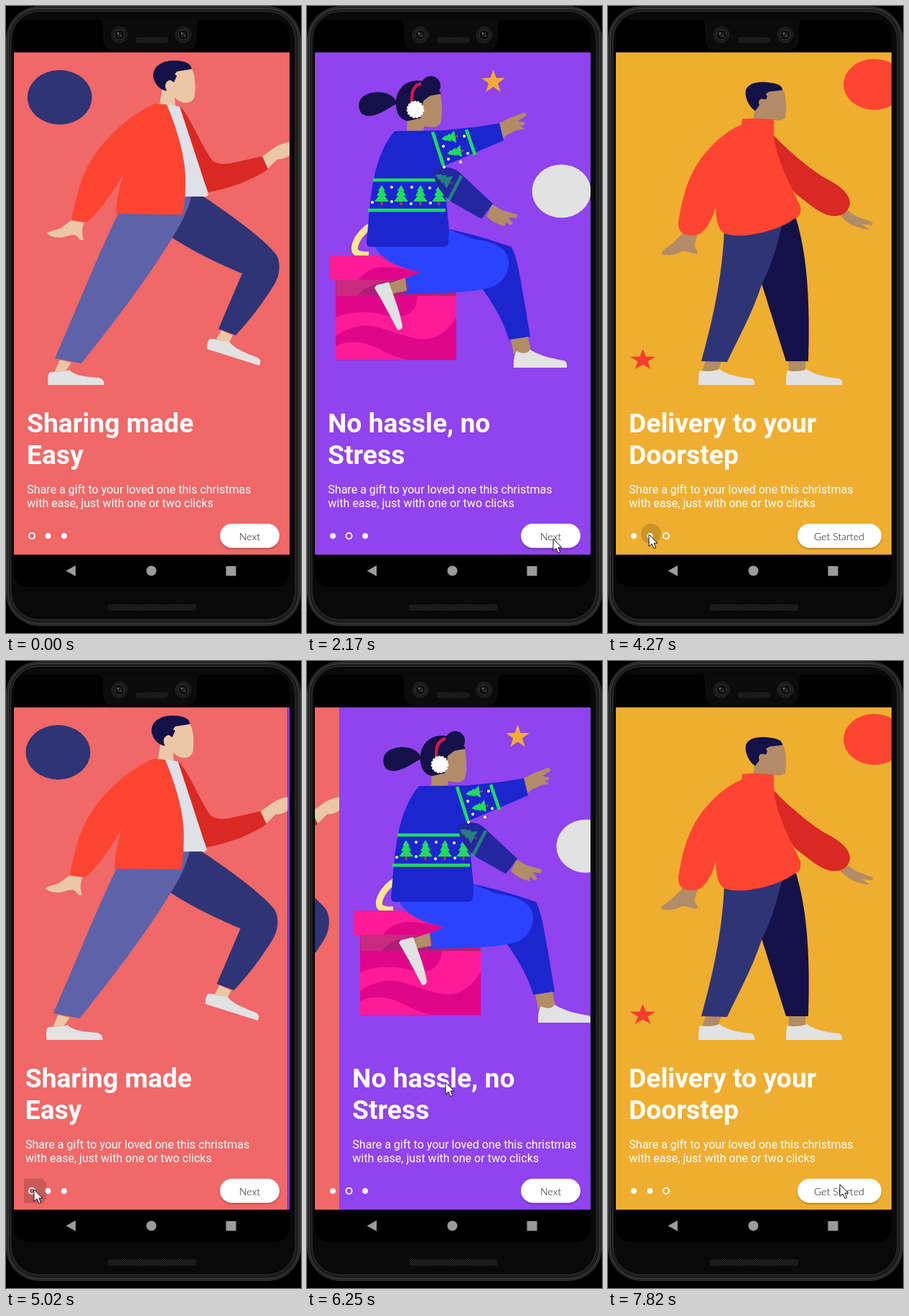
An HTML page that plays this animation: 411x872 px, repeating every 8 s.

```html
<!DOCTYPE html>
<html lang="en">
<head>
<meta charset="utf-8">
<title>Onboarding</title>
<style>
html, body { margin: 0; width: 100%; height: 100%; overflow: hidden; background: #000; }
svg { display: block; width: 411px; height: 872px; }
text { font-family: Roboto, sans-serif; fill: #fff; }
.title { font-size: 37.3px; font-weight: 700; }
.sub { font-size: 16.05px; }
.label { font: 300 14.1px Lato, sans-serif; fill: #1c0c18; text-anchor: middle; }
.skin { fill: #ebc7a6; } .brown { fill: #b28c66; }
.ink { fill: #131147; } .navy { fill: #2e3476; } .blue { fill: #1b26cf; }
.red { fill: #ff4532; } .deep { fill: #da2822; }
.shoe { fill: #e2e2e2; } .pink { fill: #ff1b97; } .rose { fill: #e0068a; }
.green { stroke: #1fdc5c; stroke-width: 4.6; fill: none; }
</style>
</head>
<body>
<svg viewBox="0 0 411 872">
<defs>
  <clipPath id="screen"><rect x="11" y="64.5" width="384" height="698.5"/></clipPath>
  <clipPath id="page"><rect x="11" y="64" width="384" height="700"/></clipPath>
  <clipPath id="dotBox"><rect x="25" y="720" width="31" height="34"/></clipPath>
  <filter id="shadow" x="-10%" y="-20%" width="120%" height="160%">
    <feDropShadow dx="0" dy="1.5" stdDeviation="1.2" flood-color="#000" flood-opacity=".35"/>
  </filter>
  <pattern id="mesh" width="3" height="3" patternUnits="userSpaceOnUse">
    <rect width="3" height="3" fill="#0c0c0c"/><path d="M0 3L3 0" stroke="#3a3a3a"/>
  </pattern>
  <g id="cam">
    <circle r="11" fill="#191919" stroke="#262626"/><circle r="7" fill="#0b0b0b" stroke="#3a3a3a"/>
    <circle r="3.5" fill="#222"/><circle cx="-2" cy="-2" r="1.2" fill="#777"/><circle cx="2.5" cy="2" r="1" fill="#555"/>
  </g>
  <g id="tree">
    <path d="M-1.5 8h3v6h-3z" fill="#a8433c"/>
    <path d="M0-14L5-6H3L7 1H4L10 9H-10L-4 1H-7L-3-6H-5Z" fill="#1fdc5c"/>
  </g>
  <path id="star" d=""/>
</defs>

<!-- phone -->
<rect x=".5" y="1" width="410" height="860.5" rx="46" fill="#1c1c1c" stroke="#3c3c3c"/>
<rect x="3" y="3.5" width="405" height="855.5" rx="43" fill="none" stroke="#4a4a4a"/>
<rect x="7" y="7.5" width="396" height="846" rx="39" fill="#090909" stroke="#333"/>
<rect x="11" y="19" width="384" height="789" rx="20"/>
<path d="M128 18Q135 19 135 28V44Q135 62 153 62H248Q266 62 266 44V28Q266 19 273 18Z" fill="#0b0b0b"/>
<use href="#cam" x="158" y="40"/><use href="#cam" x="247" y="40"/>
<rect x="181" y="43.5" width="45" height="8" rx="4" fill="url(#mesh)"/>
<rect x="142" y="832" width="123" height="9" rx="3" fill="url(#mesh)"/>
<g fill="#9b9b9b"><path d="M83.5 785.5L97 778V793Z"/><circle cx="202.5" cy="785.5" r="7"/><rect x="306.5" y="779" width="14" height="13.5"/></g>

<g clip-path="url(#screen)">
  <g class="page"><g clip-path="url(#page)">
    <rect x="11" y="64" width="384" height="700" fill="#f06868"/>
    <ellipse class="navy" cx="74.8" cy="127" rx="45" ry="38"/>
    <path class="navy" d="M256 265H275C320 295 360 325 376 345C384 357 381 375 374 387C360 410 340 437 320 458L296 449L329 372C310 364 268 346 231 322Z"/>
    <path d="M156 289L249 265H258C255 280 245 302 232 322C200 375 150 441 105 497L68 490C95 430 122 360 156 289Z" fill="#5d62a9"/>
    <path class="skin" d="M75 492L91 496L82 509L68 508ZM300 451L316 458L311 468L293 463ZM214 137L218 112L240 89L258 87C264 95 264 110 263 124C262 133 253 136 246 134Q239 132 235 127L236 140Z"/>
    <path class="ink" d="M224 118C213 117 205 105 205 96C206 82 220 75 236 76C251 76 260 82 258 88L238 91L235 95L238 97L234 106L229 103C222 104 220 111 224 118Z"/>
    <path class="shoe" d="M60 510C66 507 80 510 88 506C95 514 112 516 130 517Q137 519 137 527H59Q57 516 60 510ZM284 463C292 462 302 467 311 467C318 477 336 483 350 489Q357 492 353 500L280 477Q280 466 284 463Z"/>
    <path class="deep" d="M242 139C257 154 270 190 286 213C291 220 302 220 312 219L357 209L365 227C343 242 314 253 282 259L255 200Z"/>
    <path class="skin" d="M357 209L374 197Q386 190 395 189V208Q386 214 378 213L365 226ZM91 298L76 309C68 312 60 313 57 316C62 322 74 323 82 321C90 318 95 317 99 320C102 325 107 328 108 324C106 316 105 312 109 301Z"/>
    <path d="M222 136L242 140L282 262Q281 266 276 265H247Z" fill="#dee1e8"/>
    <path class="red" d="M208 136L224 137C240 175 251 215 250 245C250 260 249 277 246 290L153 289C154 270 158 250 164 232C150 260 130 285 113 301L91 298C98 262 106 232 124 206C148 172 182 146 208 136Z"/>
  </g></g>

  <g class="page"><g clip-path="url(#page)">
    <rect x="11" y="64" width="384" height="700" fill="#9043ee"/>
    <use href="#star" transform="translate(259.5 105.5) scale(17.3)" fill="#efae30"/>
    <ellipse class="shoe" cx="354.5" cy="257.5" rx="41" ry="37"/>
    <path d="M88 306C73 316 64 332 67 341Q70 346 86 346" fill="none" stroke="#ffe68f" stroke-width="9"/>
    <rect class="rose" x="40" y="381" width="168" height="111.5"/>
    <path class="pink" d="M40 433C62 424 88 424 110 430C135 436 153 428 154 403H208V432C195 455 175 468 150 462C115 455 95 440 70 446Q50 450 40 459ZM40 474C58 462 85 469 100 477Q120 488 140 492H40Z"/>
    <rect x="41" y="381" width="167" height="22" fill="#b01d78"/>
    <path d="M70 403C85 386 100 386 125 381H41V403Z" fill="#c82a80"/>
    <path class="pink" d="M31 347H110L158 370L137 381H31Z"/>
    <path class="rose" d="M72 381C80 368 95 362 110 363Q135 364 158 370L137 381Z"/>
    <path class="blue" d="M196 310C230 317 262 327 285 335C293 350 297 378 301 400L311 460L281 464C275 440 258 412 244 393Z"/>
    <path class="brown" d="M284 464L308 460L312 480L304 487L288 484ZM113 386L137 378L139 396L119 400Z"/>
    <path d="M94 333L198 311L232 324C266 328 282 341 281 358C280 376 268 390 250 393C222 399 180 400 134 400L141 394L137 379L158 370C120 362 102 351 94 333Z" fill="#2b43ff"/>
    <path class="shoe" d="M292 480C300 484 306 484 311 478C325 487 345 491 358 493Q363 495 362 503H288Q287 487 292 480ZM97 388L114 384C120 402 130 425 133 446Q131 452 126 450C118 435 105 410 94 392Z"/>
    <path class="ink" d="M124 132C116 117 90 117 78 126C70 132 71 146 78 151C92 158 110 144 125 136Z"/>
    <circle class="ink" cx="172.5" cy="111" r="13.5"/>
    <path class="brown" d="M156 122H186C188 135 189 150 187 160C185 169 175 170 163 167L162 176H139L140 148Z"/>
    <path class="ink" d="M124 140C122 122 132 106 150 104C165 102 182 111 187 122L171 125L162 132L158 156L140 160Q126 157 124 140Z"/>
    <path d="M147 138C144 120 149 110 159 108" fill="none" stroke="#d4164c" stroke-width="4.5"/>
    <circle cx="151" cy="144" r="11" fill="#fff" stroke="#fff" stroke-width="2.5" stroke-dasharray="3 1.5"/>
    <path class="brown" d="M268 163L284 155Q295 151 303 148L306 152L294 160L304 162L302 166H297L303 171L291 173C286 177 279 176 273 185ZM258 276L272 284L293 290L292 295L281 294L287 303L283 305L277 300L276 306Q260 303 250 292Z"/>
    <path class="blue" d="M122 174L190 173L238 168L268 163L274 187L192 222L190 232L198 312L197 329Q196 335 190 335H88Q83 335 83 328C86 300 87 270 93 240C98 215 108 190 122 174Z"/>
    <path class="green" d="M92 242H186M85 284H193M175 175L190 222M222 172L234 207"/>
    <use href="#tree" x="104" y="263"/><use href="#tree" x="131" y="263"/><use href="#tree" x="158" y="263"/><use href="#tree" x="184" y="263"/>
    <use href="#tree" transform="translate(199 183) rotate(-100) scale(.85)"/>
    <use href="#tree" transform="translate(207 203) rotate(-100) scale(.85)"/>
    <path d="M176 229C188 221 205 224 213 232L259 275L243 296L202 273C188 262 178 249 176 229Z" fill="#23279f"/>
    <path class="green" d="M215 236L197 271" opacity=".5"/>
    <use href="#tree" transform="translate(191 241) rotate(-62)" opacity=".5"/>
    <g id="snow" fill="#fff"></g>
  </g></g>

  <g class="page"><g clip-path="url(#page)">
    <rect x="11" y="64" width="384" height="700" fill="#efae30"/>
    <ellipse class="red" cx="371" cy="109" rx="43" ry="35.5"/>
    <use href="#star" transform="translate(48.5 492.5) scale(18.5 15.5)" fill="#f83c30"/>
    <path class="brown" d="M136 494H158L153 508H131ZM251 493H276L274 508H252ZM202 158L206 136L224 118L244 116C249 128 249 142 247 156Q240 161 226 158ZM104 316L90 330C80 338 73 341 75 345C84 348 95 346 103 341C112 340 118 346 125 344C126 340 119 336 121 330L125 318ZM334 284L345 292L369 301L368 305L353 303L364 310Q362 312 356 310C345 307 335 304 324 292Z"/>
    <path class="ink" d="M205 146C195 139 190 125 192 117C196 106 212 104 228 107Q243 109 243 117L225 119L220 122L222 126L220 130L214 129Q208 131 211 138Z"/>
    <path class="ink" d="M238 304L261 292C276 340 282 400 279 494H248L214 386Z"/>
    <path class="navy" d="M162 312L243 303C236 332 228 360 214 388C200 430 180 465 166 495L130 494C145 440 159 380 162 312Z"/>
    <path id="foot" class="shoe" d="M128 507C138 509 148 508 155 505C165 513 185 517 200 518Q205 520 204 527H126Q126 512 128 507Z"/>
    <use href="#foot" x="122"/>
    <path class="deep" d="M230 179C250 200 275 222 300 238C320 248 338 260 337 276Q333 291 318 292C300 294 280 275 260 260C243 235 231 215 230 179Z"/>
    <path class="red" d="M187 157Q209 155 231 158V180C234 212 254 250 268 278C270 290 265 294 258 297C235 314 180 326 160 315C152 308 150 292 150 279Q145 300 133 313Q122 323 105 317Q97 312 98 300C103 270 110 235 135 205C150 187 168 172 186 165Z"/>
  </g></g>

  <g fill="#000" opacity=".15"><circle class="tap" cx="60" cy="734"/><g clip-path="url(#dotBox)"><circle class="tap" cx="38" cy="737"/></g></g>
  <g id="dots" stroke-width="1.9"></g>
  <g id="button">
    <rect y="720" height="33.5" rx="16.75" fill="#fff" filter="url(#shadow)"/>
    <text class="label" y="743"></text>
  </g>
</g>
<path id="cursor" d="M0 0V16.5L4 13L7 19.5L9.8 18.3L7 12H12Z" fill="#fff" stroke="#111"/>
</svg>
<script>
const NS = 'http://www.w3.org/2000/svg', LOOP = 8000, WIDTH = 384;
const $ = id => document.getElementById(id);
const add = (parent, tag, attrs, text) => {
  const el = parent.appendChild(document.createElementNS(NS, tag));
  for (const k in attrs) el.setAttribute(k, attrs[k]);
  if (text) el.textContent = text;
  return el;
};

$('star').setAttribute('d', 'M' + Array.from({length: 10}, (_, i) => {
  const r = i % 2 ? 0.39 : 1, a = i * Math.PI / 5;
  return (r * Math.sin(a)).toFixed(3) + ' ' + (-r * Math.cos(a)).toFixed(3);
}).join('L') + 'Z');

const flakes = [[118, 252], [91, 273], [146, 252], [118, 272], [171, 253], [145, 275], [172, 274],
  [190, 195], [219, 181], [197, 213], [224, 205], [191, 224], [214, 217]];
for (const [cx, cy] of flakes) add($('snow'), 'circle', {cx, cy, r: 2});

const pages = [...document.querySelectorAll('.page')];
const titles = [['Sharing made', 'Easy'], ['No hassle, no', 'Stress'], ['Delivery to your', 'Doorstep']];
const sub = ['Share a gift to your loved one this christmas', 'with ease, just with one or two clicks'];
pages.forEach((page, i) => {
  titles[i].forEach((s, n) => add(page, 'text', {class: 'title', x: 29, y: 593 + 44 * n}, s));
  sub.forEach((s, n) => add(page, 'text', {class: 'sub', x: 29.3, y: 678 + 19 * n}, s));
});
const dots = [36, 58.5, 81].map(cx => add($('dots'), 'circle', {cx, cy: 737, stroke: '#fff'}));

const linear = u => u;
const smooth = u => u * u * (3 - 2 * u);
const settle = u => 1 - (1 - u) ** 4;
// cubic-bezier(.25, .1, .25, 1)
const ease = u => {
  let lo = 0, hi = 1, s;
  for (let i = 0; i < 20; i++) {
    s = (lo + hi) / 2;
    const x = .75 * s * (1 - s) + s ** 3;
    x < u ? lo = s : hi = s;
  }
  return .3 * s * (1 - s) ** 2 + 3 * s * s * (1 - s) + s ** 3;
};

// [time, page, easing towards it]
const scroll = [[0, 0], [1660, 0], [2140, 1, ease], [2390, 1], [2730, 2, ease], [4290, 2], [4640, 1, ease],
  [4680, 1], [5060, 0, ease], [5750, 0], [6050, .365, linear], [6567, 1, settle],
  [6600, 1], [6900, 1.477, linear], [7260, 2, settle]];
// [time, x, y, easing]
const pointer = [[590, 338, 822], [980, 319, 708, smooth], [1140, 323, 719, smooth], [1340, 323, 719],
  [1470, 340, 729, smooth], [1670, 340, 729], [1900, 343, 741, smooth], [2910, 343, 741],
  [3650, 110, 609, smooth], [4200, 57, 735, smooth], [4480, 57, 735], [4610, 39, 735, smooth],
  [5120, 39, 735], [5700, 333, 600, smooth], [5750, 333, 600], [6050, 193, 586, linear],
  [6300, 193, 586], [6560, 333, 590, smooth], [6600, 333, 590], [6900, 150, 571, linear],
  [7200, 150, 571], [7760, 323, 728, smooth]];

function sample(track, t) {
  const i = track.findIndex(k => k[0] > t);
  if (i < 0) return track[track.length - 1].slice(1);
  const a = track[Math.max(i - 1, 0)], b = track[i];
  const f = typeof b[b.length - 1] === 'function' ? b[b.length - 1] : linear;
  const u = f(Math.min(1, Math.max(0, (t - a[0]) / (b[0] - a[0] || 1))));
  return a.slice(1).map((v, n) => typeof v === 'number' ? v + (b[n + 1] - v) * u : v);
}

// [start, end, radius, growth time]
const tapTimes = [[4200, 4420, 14, 70], [4600, 5100, 21, 250]];
const taps = [...document.querySelectorAll('.tap')];
const box = $('button').firstElementChild, label = $('button').lastElementChild;

function draw(t) {
  const pos = sample(scroll, t)[0];
  pages.forEach((p, i) => p.setAttribute('transform', `translate(${((i - pos) * WIDTH).toFixed(2)} 0)`));
  dots.forEach((d, i) => {
    const on = i === Math.round(pos);
    d.setAttribute('r', on ? 4.1 : 3.9);
    d.setAttribute('fill', on ? 'none' : '#fff');
    d.setAttribute('stroke-opacity', on ? 1 : 0);
  });
  const last = pos > 1.02, x = last ? 264 : 298;
  box.setAttribute('x', x);
  box.setAttribute('width', 381 - x);
  label.setAttribute('x', last ? 322 : 339.5);
  label.textContent = last ? 'Get Started' : 'Next';
  taps.forEach((c, i) => {
    const [from, to, r, grow] = tapTimes[i];
    c.setAttribute('r', t < from || t > to ? 0 : r * Math.min(1, (t - from) / grow));
  });
  const [cx, cy] = sample(pointer, t);
  $('cursor').setAttribute('transform', `translate(${cx} ${cy})`);
  $('cursor').setAttribute('visibility', t < 590 ? 'hidden' : 'visible');
}

const start = performance.now();
function tick() {
  draw((performance.now() - start) % LOOP);
  requestAnimationFrame(tick);
}
tick();
</script>
</body>
</html>
```
